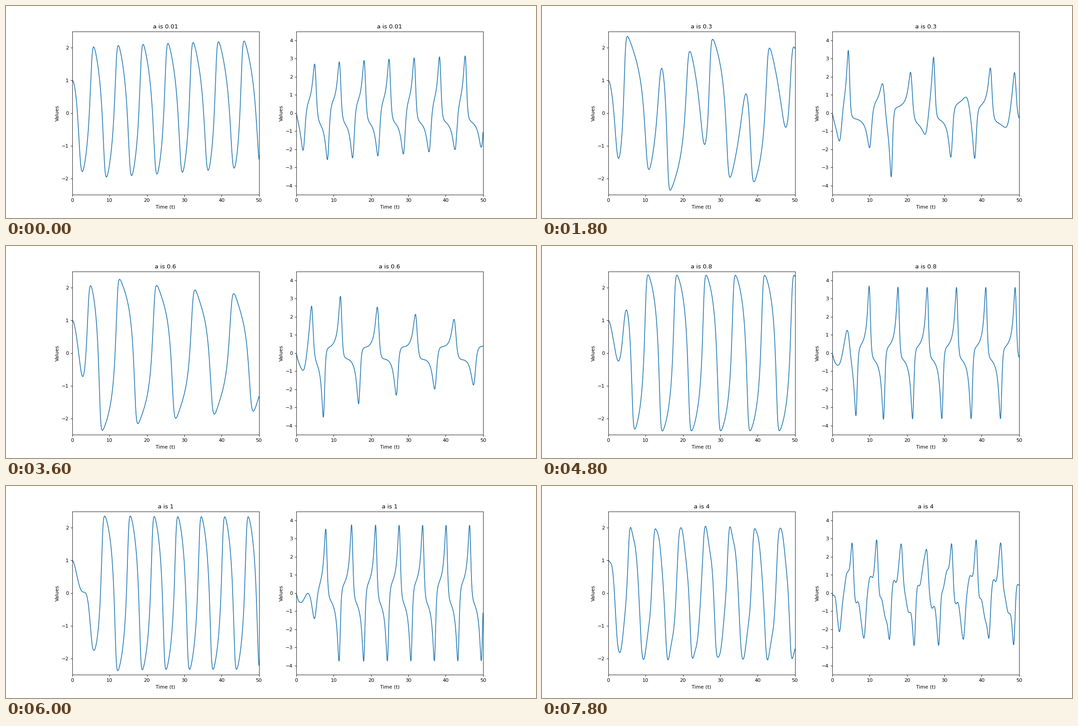
Animation of 1183 by 473 pixels, one loop 8 s. Source, as a matplotlib script:

```python
import numpy as np
import matplotlib.pyplot as plt
from matplotlib.animation import FuncAnimation

# Van der Pol oscillator driven by sin(a t), for a range of drive frequencies
FREQS = [0.01, 0.1, 0.2, 0.3, 0.4, 0.5, 0.6, 0.7, 0.8, 0.9, 1, 2, 3, 4]
MU = 1.0
T_END, STEPS = 50, 5000
FRAMES, INTERVAL, HOLD = 40, 200, 3   # each frequency holds for 3 ticks

WIDTH, HEIGHT, DPI = 1183, 473, 78.85


def rhs(t, state, a):
    x, v = state
    return np.array([v, MU * (1 - x**2) * v - x + np.sin(a * t)])


def solve(a):
    """Integrate all frequencies at once with classic Runge-Kutta."""
    t = np.linspace(0, T_END, STEPS + 1)
    h = t[1]
    out = np.empty((STEPS + 1, 2, len(a)))
    out[0] = [np.ones(len(a)), np.zeros(len(a))]
    for n in range(STEPS):
        y = out[n]
        k1 = rhs(t[n], y, a)
        k2 = rhs(t[n] + h / 2, y + h / 2 * k1, a)
        k3 = rhs(t[n] + h / 2, y + h / 2 * k2, a)
        k4 = rhs(t[n] + h, y + h * k3, a)
        out[n + 1] = y + h / 6 * (k1 + 2 * k2 + 2 * k3 + k4)
    return t, out


time, states = solve(np.array(FREQS, dtype=float))

# the tiny margin keeps the pixel size from rounding down
fig, axes = plt.subplots(
    1, 2, figsize=((WIDTH + 1e-6) / DPI, (HEIGHT + 1e-6) / DPI), dpi=DPI)

lines = []
for ax, limit in zip(axes, (2.5, 4.5)):
    ax.set(xlim=(0, T_END), ylim=(-limit, limit),
           xlabel="Time (t)", ylabel="Values")
    lines += ax.plot([], [], color="C0", lw=1.5)


def update(tick):
    k = tick // HOLD
    for j, (ax, line) in enumerate(zip(axes, lines)):
        line.set_data(time, states[:, j, k])
        ax.set_title(f"a is {FREQS[k]}")
    return lines


anim = FuncAnimation(fig, update, frames=FRAMES, interval=INTERVAL,
                     init_func=lambda: update(0), repeat=True, repeat_delay=0)
plt.show()
```
